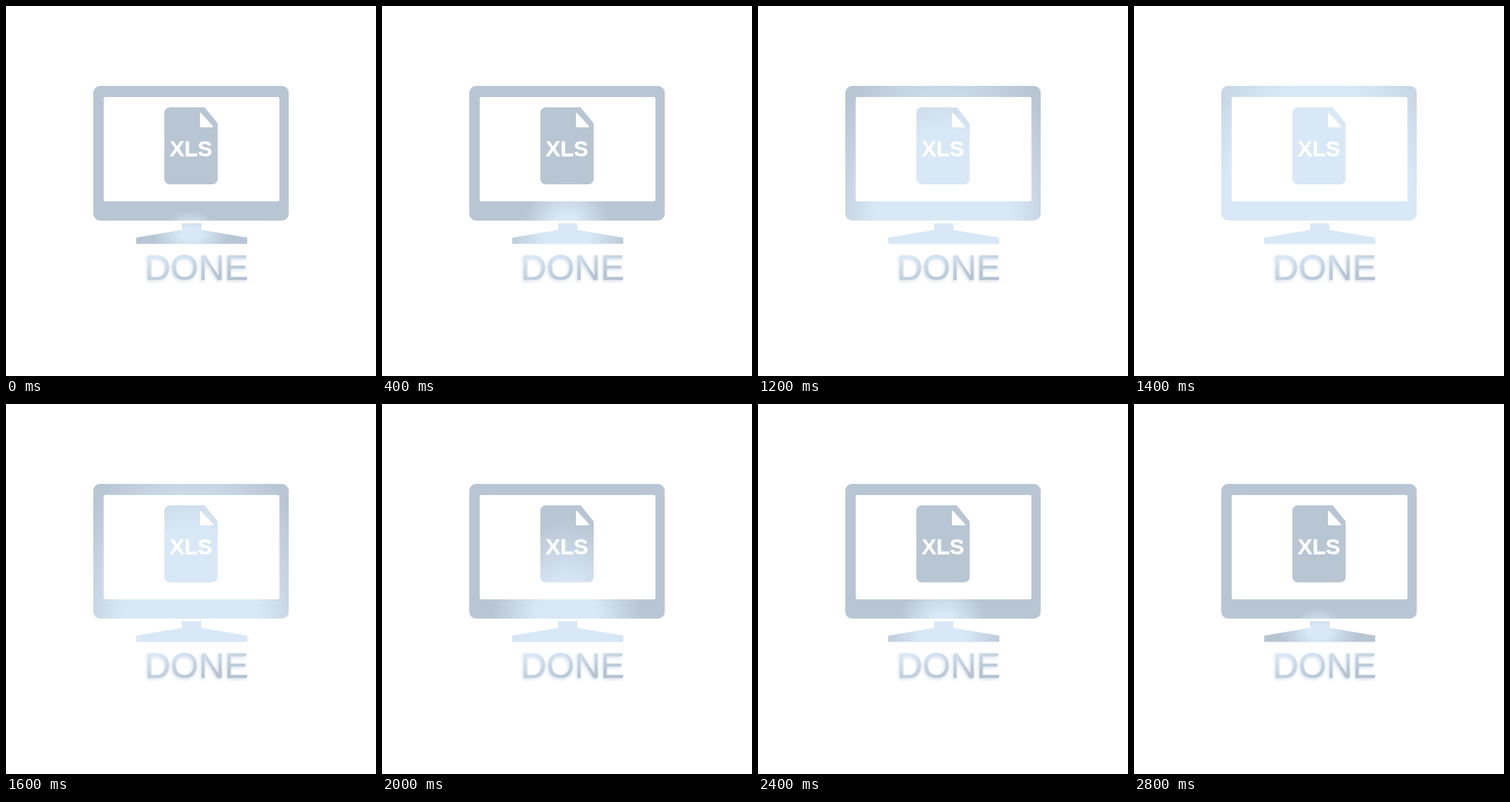
An HTML page that plays this animation: 500 by 500 pixels, repeating every 3 s.

```html
<!DOCTYPE html>
<html lang="en">
<head>
<meta charset="utf-8">
<title>Done</title>
<style>
html, body { margin: 0; width: 100%; height: 100%; overflow: hidden; background: #fff; }
svg { display: block; width: 100%; height: 100%; }
text { font-family: "Liberation Sans", Arial, sans-serif; }
.label { font-size: 29.5px; font-weight: bold; fill: #fff; stroke: #fff; stroke-width: .4; text-anchor: middle; }
.done { font-size: 48.5px; fill: url(#ink); stroke: url(#ink); stroke-width: .4;
  filter: drop-shadow(-1px 2px 2px rgba(165, 188, 215, .45)); }
</style>
</head>
<body>
<svg viewBox="0 0 500 500">
  <defs>
    <linearGradient id="ink" gradientUnits="userSpaceOnUse" x1="250" y1="330" x2="258" y2="372">
      <stop offset="0" stop-color="#d8e8f6"/>
      <stop offset="1" stop-color="#b5c2d0"/>
    </linearGradient>
  </defs>
  <path id="monitor" fill-rule="evenodd" d="M127 108H373a9 9 0 0 1 9 9V281a9 9 0 0 1-9 9H127a9 9 0 0 1-9-9V117a9 9 0 0 1 9-9Z
    M134 123a2 2 0 0 0-2 2V262a2 2 0 0 0 2 2H367.500a2 2 0 0 0 2-2V125a2 2 0 0 0-2-2Z"/>
  <path id="stand" d="M238 293.500H264V302.500L326 313V321.500H176V313L238 302.500Z"/>
  <path id="doc" d="M221 137H268.500L286 158.500V235q-1 5-7 6H221q-6-1-7-6V143q1-5 7-6Z"/>
  <path fill="#fff" d="M262 146q0-3 2-1L279.500 162q1 2-1 2H264q-2 0-2-2Z"/>
  <text class="label" x="250" y="202.700">XLS</text>
  <text class="done" x="187.500" y="370">DONE</text>
</svg>
<script>
const STEP = 200;
const STEPS = 15;
const CENTER = "249.5 308";

const make = (name, attrs, parent) => {
  const el = document.createElementNS("http://www.w3.org/2000/svg", name);
  for (const key in attrs) el.setAttribute(key, attrs[key]);
  return parent.appendChild(el);
};

// A light that fades outwards; widen stretches it sideways
function addGlow(id, widen) {
  const grad = make("radialGradient", {
    id: id + "Glow", gradientUnits: "userSpaceOnUse", cx: 0, cy: 0
  }, document.querySelector("defs"));
  const inner = make("stop", { "stop-color": "#d8e8f6" }, grad);
  make("stop", { offset: 1, "stop-color": "#b8c5d3" }, grad);
  document.getElementById(id).setAttribute("fill", `url(#${id}Glow)`);
  return { grad, inner, widen };
}
const glows = [addGlow("monitor", 1), addGlow("doc", 1), addGlow("stand", 1.45)];

const fold = i => Math.min(i, STEPS - 1 - i);

// Grows and shrinks one level per step; level 5 holds the one before it
function levelAt(time) {
  const i = Math.floor(time / STEP) % STEPS;
  return fold(i) === 5 ? fold(i - 1) : fold(i);
}

function draw(time) {
  const level = levelAt(time);
  const near = 10 * 1.45 ** level;
  const far = 36 * 1.3 ** level;
  const tall = Math.min(1.5, 0.9 + 0.15 * level);
  for (const { grad, inner, widen } of glows) {
    grad.setAttribute("r", far);
    grad.setAttribute("gradientTransform", `translate(${CENTER}) scale(${widen} ${tall})`);
    inner.setAttribute("offset", near / far);
  }
}

const start = performance.now();
function tick() {
  draw(performance.now() - start);
  requestAnimationFrame(tick);
}
tick();
</script>
</body>
</html>
```
